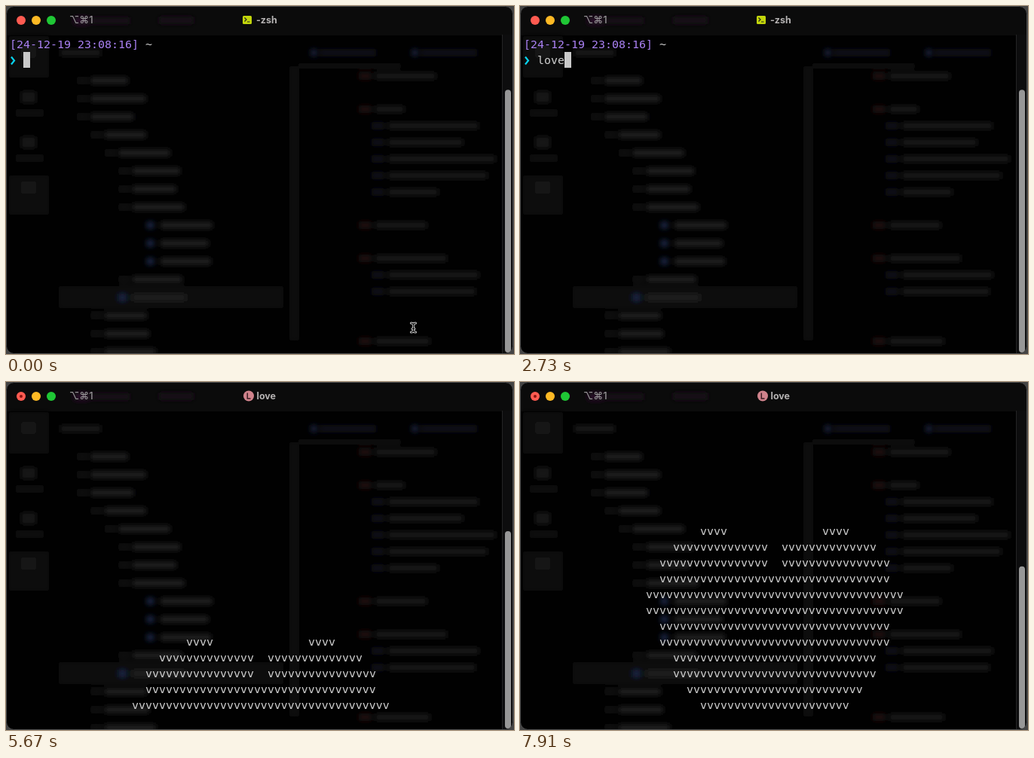
An HTML page that plays this animation: 674 by 462 pixels, repeating every 8 s.

```html
<!DOCTYPE html>
<html lang="en">
<head>
<meta charset="utf-8">
<title>Terminal heart</title>
<style>
  html, body { margin: 0; width: 100%; height: 100%; overflow: hidden; background: #444; }
  svg { display: block; }
  .mono { font: 14.95px "DejaVu Sans Mono", "Noto Sans Mono", monospace; fill: #cfcfcf; white-space: pre; }
  .title { font: 700 12.5px Inter, "Open Sans", sans-serif; fill: #b6b3b3; }
  .hint { font: 500 13px Inter, "DejaVu Sans", sans-serif; fill: #969496; }
</style>
</head>
<body>
<svg width="674" height="462" viewBox="0 0 674 462">
  <defs>
    <filter id="blur" x="-5%" y="-5%" width="110%" height="110%"><feGaussianBlur stdDeviation="3"/></filter>
    <clipPath id="frame"><rect x="0.5" y="0.5" width="672" height="461" rx="10"/></clipPath>
  </defs>
  <g clip-path="url(#frame)">
    <rect width="674" height="462" fill="#010101"/>
    <rect width="674" height="39" fill="#0b0b0b"/>
    <g id="ghost" filter="url(#blur)"></g>
    <rect x="658" y="38" width="16" height="424" fill="#0d0d0e"/>
    <path d="M658.5 38V462" stroke="#242425"/>
    <rect id="thumb" x="662" width="8" rx="4" fill="#979797"/>
  </g>
  <rect x="0.5" y="0.5" width="672" height="461" rx="10" fill="none" stroke="#4e4e4e"/>

  <circle cx="20" cy="19" r="6" fill="#ff5b51"/>
  <circle id="busyDot" cx="20" cy="19" r="2" fill="#8a1411"/>
  <circle cx="40" cy="19" r="6" fill="#fdb924"/>
  <circle cx="60" cy="19" r="6" fill="#1fc735"/>
  <text class="hint" x="84" y="23">⌥⌘1</text>

  <g id="shellTitle">
    <rect x="314" y="13" width="12" height="11" rx="1.5" fill="#c3d60b"/>
    <path d="M316.5 15.5l2.5 2.5l-2.5 2.5M320 21h3.5" fill="none" stroke="#222" stroke-width="1.2"/>
    <text class="title" x="332" y="23">-zsh</text>
  </g>
  <g id="loveTitle">
    <circle cx="322" cy="18.5" r="7" fill="#d0838c"/>
    <path d="M320.3 14.5V22H324.5" fill="none" stroke="#3a1d22" stroke-width="1.5"/>
    <text class="title" x="332.5" y="23">love</text>
  </g>

  <g id="prompt">
    <text class="mono" x="5" y="56" style="fill:#ab82f5">[24-12-19 23:08:16]</text>
    <text class="mono" x="185" y="56">~</text>
    <path d="M7 67.5l4 5l-4 5" fill="none" stroke="#08d3ee" stroke-width="2.2"/>
    <text id="typed" class="mono" x="23" y="77"></text>
    <rect id="caret" y="61" width="9" height="21" fill="#c9c9c9"/>
  </g>
  <g id="heart"></g>
  <g id="pointer" fill="none" stroke-linecap="round">
    <path id="beam" stroke="#d8d8d8" stroke-width="3"
          d="M537.5 421q3 0 3 2.5v7q0 2.5 -3 2.5M543.5 421q-3 0 -3 2.5M540.5 430.5q0 2.5 3 2.5M539 428.5h3"/>
  </g>
</svg>
<script>
const LOOP = 8000, TICK = 70, CELL = 9, LINE = 21, LEFT = 5, LAST_BASELINE = 434;
const $ = id => document.getElementById(id);

function add(parent, tag, attrs, text = "") {
  const node = document.createElementNS("http://www.w3.org/2000/svg", tag);
  for (const key in attrs) node.setAttribute(key, attrs[key]);
  node.textContent = text;
  parent.append(node);
  return node;
}

let seed = 7;
function random(min, max) {
  seed = seed * 16807 % 2147483647;
  return min + (max - min) * seed / 2147483647;
}

// Dim window showing through the translucent terminal
const box = (x, y, width, height, fill) => add($("ghost"), "rect", { x, y, width, height, rx: 2, fill });
const smudge = (x, y, width, fill) => box(x, y - 5, width, 10, fill);

function drawSidebar() {
  box(4, 40, 53, 55, "#09090a");
  box(4, 225, 53, 52, "#0e0e0f");
  for (let y = 61; y < 300; y += 60) {
    box(20, y - 8, 20, 16, "#131314");
    smudge(13, y + 21, 37, "#101011");
  }
}

function drawTree() {
  const depthOf = i => i < 8 ? Math.max(0, Math.min(3, i - 2)) : i < 11 ? 5 : i < 13 ? 3 : 1;
  box(70, 372, 298, 29, "#0d0d0e");
  smudge(72, 62, 54, "#161617");
  for (let i = 0; i < 16; i++) {
    const depth = depthOf(i), x = 112 + 18.5 * depth, y = 99 + 24 * i;
    const isFile = depth === 5 || i === 12;
    smudge(x, y, random(50, 76), "#1b1b1d");
    smudge(x - 18, y, isFile ? 10 : 14, isFile ? "#17243f" : "#101011");
  }
}

function drawEditor() {
  const blocks = [[0, 1], [2, 6], [9, 1], [11, 3], [16, 1]];
  box(376, 80, 13, 364, "#0d0d0e");
  box(388, 76, 136, 7, "#0e0e0f");
  for (const x of [404, 538]) {
    smudge(x, 62, 9, "#141d36");
    smudge(x + 13, 62, 74, "#111112");
  }
  for (const [first, count] of blocks) {
    for (let i = 0; i < count; i++) {
      const x = i ? 485 : 468, y = 93 + 22 * (first + i);
      smudge(x, y, 17, i ? "#111112" : "#1c1110");
      smudge(x + 22, y, i ? random(55, 150) : random(35, 100), "#151516");
    }
  }
}

box(90, 14, 20, 11, "#280c25");
box(112, 15, 52, 9, "#151115");
box(203, 14, 46, 10, "#130f12");
drawSidebar();
drawTree();
drawEditor();

// Heart outline in cells either side of the middle column; the top lobes leave a notch
const MIDDLE = 37, ROWS = 12;
const outerCells = i => i ? 1 + 2 * Math.round(9.2 - 0.58 * Math.abs(i - 4.5)) : 11;
const notchCells = i => i === 0 ? 7 : i < 3 ? 1 : 0;

const rows = Array.from({ length: ROWS }, (_, i) => {
  const row = add($("heart"), "g", {});
  const outer = outerCells(i), notch = notchCells(i);
  const run = (column, length) =>
    add(row, "text", { class: "mono", x: LEFT + column * CELL, y: i * LINE }, "v".repeat(length));
  if (notch) {
    run(MIDDLE - outer, outer - notch);
    run(MIDDLE + notch, outer - notch);
  } else {
    run(MIDDLE - outer, 2 * outer);
  }
  return row;
});

add($("pointer"), "path", { d: $("beam").getAttribute("d"), stroke: "#050505", "stroke-width": 1.2 });

const COMMAND = "love", FIRST_KEY = 1890, KEY_GAP = 210;
const RUN_TIME = 3220, TITLE_TIME = 3290;
const FIRST_LINE_TICK = 49, TICKS_PER_LINE = 4.42;
const BLANK_LINES = 3, VISIBLE_LINES = 20, BACKLOG = 4.2;

const show = (node, on) => { node.style.display = on ? "" : "none"; };

// The second key follows after a double pause
function keysTyped(t) {
  if (t < FIRST_KEY) return 0;
  return Math.min(COMMAND.length, Math.max(1, Math.floor((t - FIRST_KEY) / KEY_GAP)));
}

function linesPrinted(t) {
  const tick = Math.floor(t / TICK);
  return Math.max(0, 1 + Math.floor((tick - FIRST_LINE_TICK) / TICKS_PER_LINE));
}

function render(t) {
  const typed = keysTyped(t);
  $("typed").textContent = COMMAND.slice(0, typed);
  $("caret").setAttribute("x", LEFT + CELL * (2 + typed));
  show($("prompt"), t < RUN_TIME);
  show($("pointer"), typed === 0);

  const running = t >= TITLE_TIME;
  show($("shellTitle"), !running);
  show($("loveTitle"), running);
  show($("busyDot"), running);

  const lines = linesPrinted(t);
  const heartRows = Math.max(0, lines - BLANK_LINES);
  rows.forEach((row, i) => show(row, i < heartRows));
  $("heart").setAttribute("transform", `translate(0 ${LAST_BASELINE - (heartRows - 1) * LINE})`);

  const height = 422 * VISIBLE_LINES / (VISIBLE_LINES + BACKLOG + lines);
  $("thumb").setAttribute("y", 460 - height);
  $("thumb").setAttribute("height", height);
}

const start = performance.now();
function loop() {
  render((performance.now() - start) % LOOP);
  requestAnimationFrame(loop);
}
loop();
</script>
</body>
</html>
```
